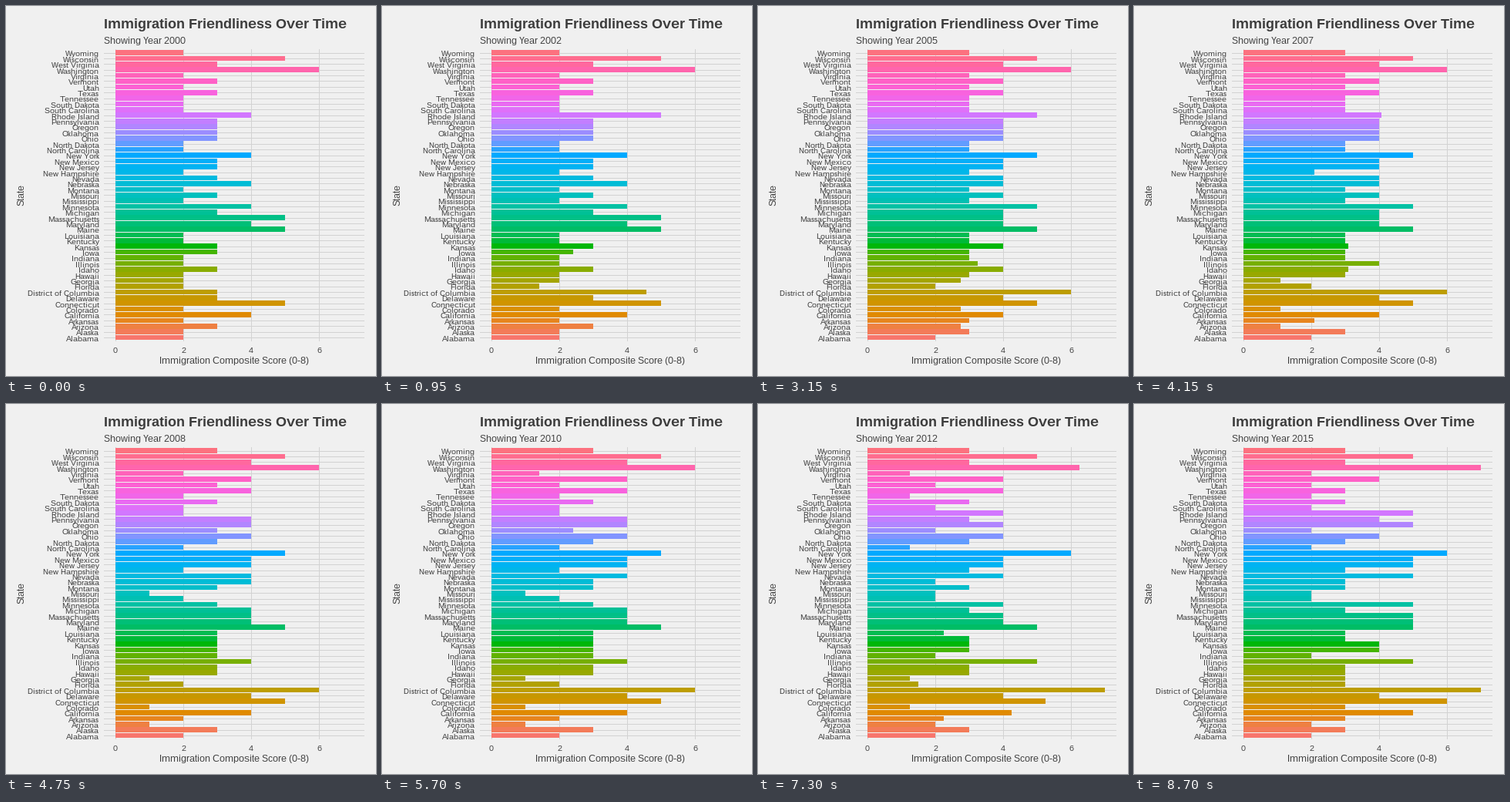
Write a matplotlib script that moves like this. It is 480 px wide and 480 px high and loops after 9000 ms.

```python
import numpy as np
import matplotlib.pyplot as plt
from matplotlib.animation import FuncAnimation
from matplotlib.patches import Rectangle

SIZE, DPI = 480, 72
FRAMES, STEP = 180, 50
FIRST, LAST = 2000, 2015
X0, UNIT = 142.45, 43.97        # zero line and pixels per score point
BASE, ROW = 433.84, 7.39        # bottom of the lowest bar, row pitch
LEFT, RIGHT, TOP, BOTTOM = 127, 465, 56, 435
PAPER, GRID, INK = "#F0F0F0", "#D2D2D2", "#3C3C3C"

plt.rcParams.update({
    "font.family": "Liberation Sans",
    "text.hinting": "native",
    "text.hinting_factor": 1,
    "text.color": INK,
})

STATES = """Alabama,Alaska,Arizona,Arkansas,California,Colorado,Connecticut,
Delaware,District of Columbia,Florida,Georgia,Hawaii,Idaho,Illinois,Indiana,
Iowa,Kansas,Kentucky,Louisiana,Maine,Maryland,Massachusetts,Michigan,Minnesota,
Mississippi,Missouri,Montana,Nebraska,Nevada,New Hampshire,New Jersey,
New Mexico,New York,North Carolina,North Dakota,Ohio,Oklahoma,Oregon,
Pennsylvania,Rhode Island,South Carolina,South Dakota,Tennessee,Texas,Utah,
Vermont,Virginia,Washington,West Virginia,Wisconsin,Wyoming"""


def names(text):
    return [n.strip() for n in text.split(",")]


STATES = names(STATES)

# Scores in the first year; every other state starts at 2.
START = {
    3: """Arizona,Delaware,District of Columbia,Idaho,Iowa,Kansas,Michigan,
       Missouri,Nevada,New Jersey,New Mexico,Ohio,Oklahoma,Oregon,Pennsylvania,
       Texas,Vermont,West Virginia""",
    4: "California,Maryland,Minnesota,Nebraska,New York,Rhode Island",
    5: "Connecticut,Maine,Massachusetts,Wisconsin",
    6: "Washington",
}

# In 2003 all states but these gain a point.
STEADY = names("""Alabama,California,Connecticut,Maine,Maryland,Massachusetts,
Nebraska,Rhode Island,Washington,Wisconsin""")

# A repeated name moves by that many points.
UP = {
    2001: "Rhode Island,District of Columbia",
    2002: "District of Columbia",
    2003: ",".join(s for s in STATES if s not in STEADY),
    2006: "Illinois",
    2011: "New York,Rhode Island,Rhode Island,Illinois,Minnesota",
    2012: "Alabama,District of Columbia,New Hampshire,Missouri,Arizona",
    2013: """Washington,Virginia,Tennessee,North Carolina,Louisiana,Georgia,
          Florida,Florida,Connecticut,Colorado,California,Arkansas""",
    2014: """Pennsylvania,Oregon,Rhode Island,New Mexico,New Jersey,Nevada,
          Nebraska,Minnesota,Massachusetts,Maryland,Kansas,Iowa,Georgia,
          Colorado""",
}
DOWN = {
    2002: "Florida,Iowa",
    2003: "Massachusetts",
    2005: "Arizona",
    2006: "Arizona,Colorado,Georgia",
    2007: """Arizona,Colorado,Georgia,Arkansas,Rhode Island,New Hampshire,
          Kansas,Idaho""",
    2008: """Minnesota,Minnesota,Missouri,Missouri,Missouri,Virginia,Tennessee,
          South Carolina,Oklahoma,Rhode Island,Rhode Island,Mississippi,
          North Carolina""",
    2009: "Utah,Nebraska",
    2010: "Virginia,Oklahoma",
    2011: "Alabama,Indiana,Florida,North Carolina",
    2012: """Tennessee,West Virginia,Pennsylvania,Nebraska,Michigan,
          Louisiana""",
    2014: "Texas",
}


def build_scores():
    scores = np.full((len(STATES), LAST - FIRST + 1), 2)
    for value, group in START.items():
        for name in names(group):
            scores[STATES.index(name)] = value
    for sign, events in ((1, UP), (-1, DOWN)):
        for year, group in events.items():
            for name in names(group):
                scores[STATES.index(name), year - FIRST:] += sign
    return scores


def hcl(hue, chroma=100, light=65):
    """Polar LUV colour to clipped sRGB."""
    h = np.radians(hue)
    y = ((light + 16) / 116) ** 3
    u = chroma * np.cos(h) / (13 * light) + 0.1978398
    v = chroma * np.sin(h) / (13 * light) + 0.4683363
    x = 9 * y * u / (4 * v)
    z = -x / 3 - 5 * y + 3 * y / v
    rgb = np.array([3.240479 * x - 1.537150 * y - 0.498535 * z,
                    -0.969256 * x + 1.875992 * y + 0.041556 * z,
                    0.055648 * x - 0.204043 * y + 1.057311 * z])
    rgb = np.clip(rgb, 0, 1)
    return np.where(rgb > 0.00304, 1.055 * rgb ** (1 / 2.4) - 0.055, 12.92 * rgb)


SCORES = build_scores()
KNOTS = np.round(np.arange(LAST - FIRST + 1) * (FRAMES - 1) / (LAST - FIRST))

fig = plt.figure(figsize=(SIZE / DPI, SIZE / DPI), dpi=DPI, facecolor=PAPER)
ax = fig.add_axes([0, 0, 1, 1])
ax.set(xlim=(0, SIZE), ylim=(SIZE, 0))
ax.axis("off")


def box(x0, y0, x1, y1, color):
    return ax.add_patch(Rectangle((x0, y0), x1 - x0, y1 - y0, facecolor=color,
                                  linewidth=0, antialiased=False))


def edge(score):
    return int(X0 + UNIT * score + 1e-6)


def label(x, y, text, size, **kw):
    return ax.text(x, y, text, fontsize=size, va=kw.pop("va", "baseline"), **kw)


for i in range(len(STATES)):
    y = int(BASE - (i + 0.45) * ROW)
    box(LEFT, y, RIGHT, y + 1, GRID)
for score in (0, 2, 4, 6):
    x = edge(score)
    box(x, TOP, x + 1, BOTTOM, GRID)
    label(x, 450, str(score), 10, ha="center")

bars = []
for i, name in enumerate(STATES):
    bars.append(box(edge(0), int(BASE - (i + 0.9) * ROW), edge(2),
                    int(BASE - i * ROW), hcl(15 + 360 * i / len(STATES))))
    label(121, int(BASE - i * ROW + 1.5), name, 10, ha="right")

label(127, 29, "Immigration Friendliness Over Time", 18, weight="bold")
label(296, 464, "Immigration Composite Score (0-8)", 12, ha="center")
label(25, 245, "State", 12, rotation=90, ha="right", va="center")
subtitle = label(127, 49, "", 12)


def draw(frame):
    year = FIRST + round(frame * (LAST - FIRST) / (FRAMES - 1))
    subtitle.set_text(f"Showing Year {year}")
    for bar, row in zip(bars, SCORES):
        bar.set_width(edge(np.interp(frame, KNOTS, row)) - edge(0))
    return [subtitle, *bars]


anim = FuncAnimation(fig, draw, frames=FRAMES, interval=STEP, repeat=True,
                     repeat_delay=0)
plt.show()
```
